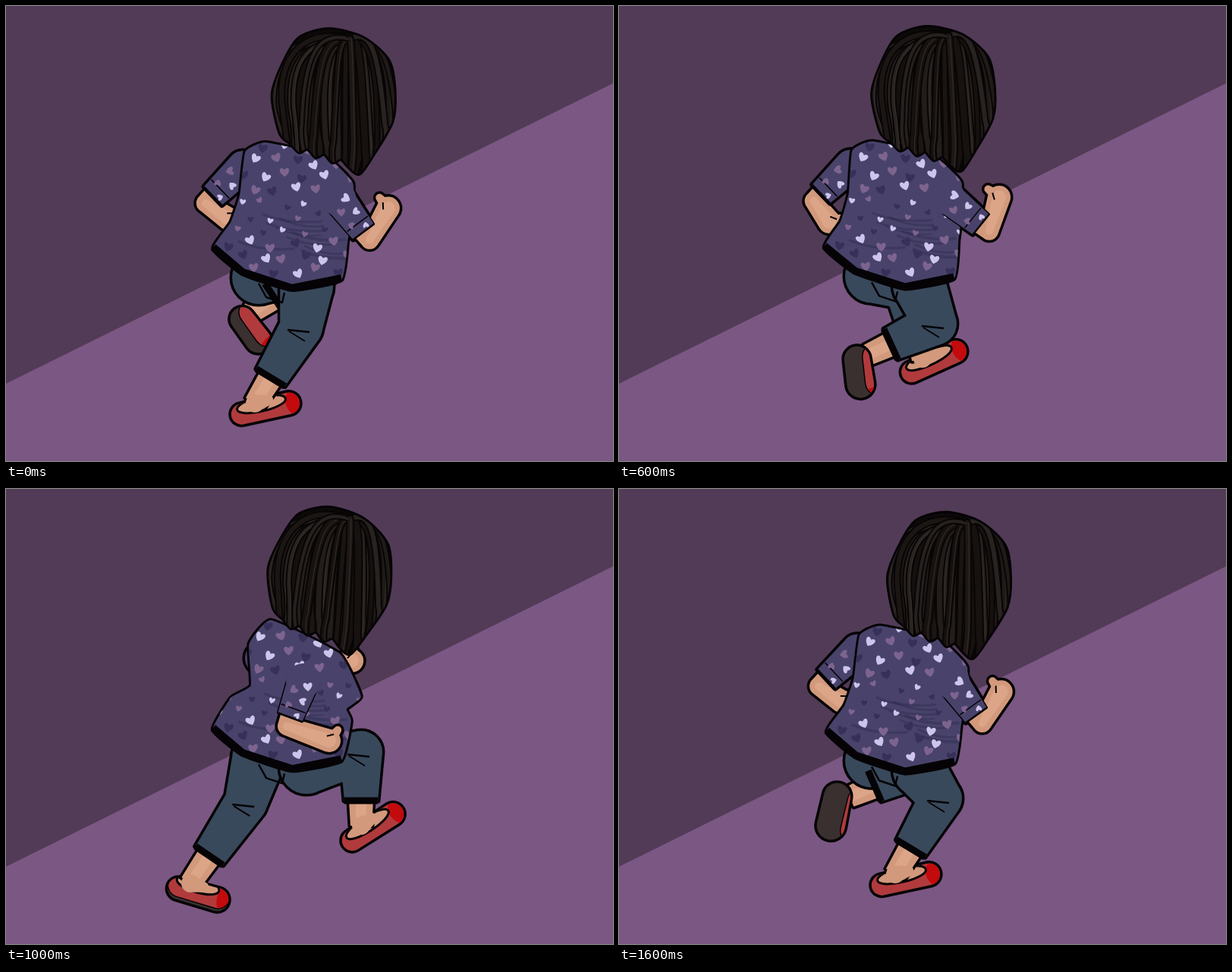
Animation of 800x600 px, one loop 1700 ms. Source, as an HTML page with a canvas:

```html
<!DOCTYPE html>
<html lang="en">
<head>
<meta charset="utf-8">
<title>Running girl</title>
<style>
html, body { margin: 0; width: 100%; height: 100%; overflow: hidden; background: #523b57; }
canvas { display: block; width: 800px; height: 600px; }
</style>
</head>
<body>
<canvas id="stage" width="800" height="600"></canvas>
<script>
const ctx = document.getElementById('stage').getContext('2d');
const LOOP = 1700, STEP = 100, BEAT = 200;
const INK = '#050305', SHIRT = '#49436b', DENIM = '#39495c', SKIN = '#d2997c', GLOW = '#dca588',
  RED = '#b13a3c', TOE = '#c30a0d', SOLE = '#39302f';
const PRINT = ['#cdc5ec', '#7d648f', '#373159'];

const nums = s => s.match(/-?[\d.]+/g).map(Number);
const lerp = (a, b, t) => a + (b - a) * t;
const mix = (a, b, t) => a.map((v, i) => lerp(v, b[i], t));
const clamp = v => Math.min(1, Math.max(0, v));
const ease = (from, to, v) => { const t = clamp((v - from) / (to - from)); return t * t * (3 - 2 * t); };
const wave = (time, peak, n = 1) => Math.cos(2 * Math.PI * n * (time - peak) / LOOP);
const rnd = n => { const v = Math.sin(n * 12.9898 + 4) * 43758.5453; return v - Math.floor(v); };

// Motion paths: one point per beat. Ankles carry the foot's angle too.
const path = s => s.split(' ').map(nums);
const KNEE = path('389,424 376,432 365,430 417,419 473,371 468,347 464,362 444,384 424,408');
const ANKLE_R = path('328,524,-13 279,538,38 264,498,65 328,460,82 397,457,32 468,444,-33 477,457,-25 439,475,-20 364,508,-13');
const ANKLE_L = path('322,405,53 412,425,-5 462,404,-47 400,465,-25 312,504,-23 243,520,16 232,472,98 266,428,114 304,406,102');

// Smooth periodic curve through a path; the last beat is cut short by the loop.
function follow(points, time) {
  const n = points.length, i = Math.floor(time / BEAT);
  const at = k => points[(k + n) % n];
  const when = k => k * BEAT - (k >= n ? n * BEAT - LOOP : k < 0 ? LOOP - n * BEAT : 0);
  const span = when(i + 1) - when(i), t = (time - when(i)) / span, t2 = t * t, t3 = t2 * t;
  return at(i).map((p, j) => {
    const q = at(i + 1)[j];
    const m = span * (q - at(i - 1)[j]) / (when(i + 1) - when(i - 1));
    const w = span * (at(i + 2)[j] - p) / (when(i + 2) - when(i));
    return (2 * t3 - 3 * t2 + 1) * p + (t3 - 2 * t2 + t) * m + (3 * t2 - 2 * t3) * q + (t3 - t2) * w;
  });
}

// Torso seen from behind and turned; both share the hem.
const HEM = ' 273,318 312,351 377,372 442,359 ';
const BACK = nums('342,178 315,190 308,246 296,283' + HEM + '450,308 453,290 457,232 420,196');
const TURNED = nums('350,174 321,205 323,260 297,276' + HEM + '455,307 449,291 468,274 440,218');

// Arms: shoulder by turn, then elbow and hand for each stage of the swing.
const ARM_L = { square: [312, 210], turned: [332, 224],
  mid: [263, 260, 293, 280], high: [240, 250, 237, 297], side: [334, 252, 362, 256], far: [411, 238, 452, 225] };
const ARM_R = { square: [438, 252], turned: [388, 254],
  mid: [479, 309, 504, 267], high: [511, 266, 494, 214], side: [405, 329, 462, 332], far: [359, 312, 415, 332] };

// Smooth closed path through flat x,y pairs.
function blob(p, k) {
  const n = p.length / 2, X = i => p[2 * ((i + n) % n)], Y = i => p[2 * ((i + n) % n) + 1];
  const shape = new Path2D();
  shape.moveTo(X(0), Y(0));
  for (let i = 0; i < n; i++) {
    shape.bezierCurveTo(
      X(i) + (X(i + 1) - X(i - 1)) * k, Y(i) + (Y(i + 1) - Y(i - 1)) * k,
      X(i + 1) - (X(i + 2) - X(i)) * k, Y(i + 1) - (Y(i + 2) - Y(i)) * k, X(i + 1), Y(i + 1));
  }
  shape.closePath();
  return shape;
}

// Tapered limb through x,y,r triples, flat at its last point unless rounded.
function tube(p, round) {
  const shape = new Path2D();
  for (let i = 0; i < p.length; i += 3) {
    const [x, y, r, X, Y, R] = p.slice(i, i + 6), last = i + 3 >= p.length;
    if (!last || round) {
      shape.moveTo(x + r, y);
      shape.arc(x, y, r, 0, 2 * Math.PI);
      shape.closePath();
    }
    if (last) break;
    const len = Math.hypot(X - x, Y - y) || 1, nx = (Y - y) / len, ny = (x - X) / len;
    shape.moveTo(x + nx * r, y + ny * r);
    shape.lineTo(X + nx * R, Y + ny * R);
    shape.lineTo(X - nx * R, Y - ny * R);
    shape.lineTo(x - nx * r, y - ny * r);
    shape.closePath();
  }
  return shape;
}

function line(p, width) {
  ctx.beginPath();
  for (let i = 0; i < p.length; i += 2) ctx.lineTo(p[i], p[i + 1]);
  ctx.lineWidth = width;
  ctx.strokeStyle = INK;
  ctx.stroke();
}

function paint(shape, color, edge = 3.5) {
  if (edge) {
    ctx.lineWidth = edge * 2;
    ctx.strokeStyle = INK;
    ctx.stroke(shape);
  }
  ctx.fillStyle = color;
  ctx.fill(shape);
}

// Line across a limb at b, seen from a.
function across(ax, ay, bx, by, half, width) {
  const len = Math.hypot(bx - ax, by - ay) || 1, nx = (by - ay) / len * half, ny = (ax - bx) / len * half;
  line([bx - nx, by - ny, bx + nx, by + ny], width);
}

// Lower foot edge and sole come into view as the foot tips down.
function shoe(ax, ay, angle, sole) {
  const half = 39 - 13 * Math.sin(Math.PI * sole), h = 16 + 6 * sole;
  ctx.save();
  ctx.translate(ax, ay);
  ctx.rotate(angle * Math.PI / 180);
  ctx.translate(12 + 14 * sole, 10 + 8 * sole);
  const body = tube([-half - 7 + h * .85, 0, h * .85, half + 7 - h * .9, 0, h * .9], true);
  paint(body, SOLE);
  ctx.clip(body);
  ctx.translate(0, -sole * h * 2);
  paint(body, RED, sole > .1 ? 1.5 : 0);
  ctx.clip(body);
  const toe = new Path2D();
  toe.ellipse(half + 8, 0, half * .5, h * 1.3, 0, 0, 2 * Math.PI);
  paint(toe, TOE, 0);
  if (sole < .3) {
    const mouth = new Path2D();
    mouth.ellipse(-half * .1, -h * .45, half * .8, h * .5, 0, 0, 2 * Math.PI);
    paint(mouth, SKIN, 3);
  }
  ctx.restore();
}

function leg(hx, hy, [kx, ky], [ax, ay, angle]) {
  const sole = clamp(angle / 130), cx = lerp(kx, ax, .66), cy = lerp(ky, ay, .66);
  const shin = () => {
    paint(tube([cx, cy, 16, ax, ay, 14]), SKIN);
    paint(tube([cx, cy, 7, ax, ay, 7]), GLOW, 0);
  };
  if (sole >= .3) shin();
  shoe(ax, ay, angle, sole);
  if (sole < .3) {
    const turn = angle * Math.PI / 180;
    shin();
    paint(tube([ax, ay, 12, ax + 18 * Math.cos(turn), ay + 18 * Math.sin(turn), 7], true), SKIN, 0);
  }
  paint(tube([hx, hy, 35, kx, ky, 28, cx, cy, 22]), DENIM);
  across(kx, ky, cx, cy, 22, 9);
  line([kx - 18, ky + 3, kx + 11, ky + 6], 2.5);
  line([kx - 16, ky + 5, kx + 5, ky + 18], 2);
}

function forearm([sx, sy, ex, ey, hx, hy]) {
  const len = Math.hypot(hx - ex, hy - ey) || 1, dx = (hx - ex) / len, dy = (hy - ey) / len;
  const arm = tube([lerp(sx, ex, .8), lerp(sy, ey, .8), 13, ex, ey, 12, hx, hy, 15], true);
  arm.addPath(tube([hx, hy, 9, hx + dy * 17 + dx * 6, hy - dx * 17 + dy * 6, 5], true));
  paint(arm, SKIN);
  paint(tube([ex, ey, 5, hx, hy, 9], true), GLOW, 0);
  line([hx + dy * 10 + dx * 3, hy - dx * 10 + dy * 3, hx + dy * 5 - dx * 5, hy - dx * 5 - dy * 5], 2);
}

function sleeve([sx, sy, ex, ey], edge) {
  const cx = lerp(sx, ex, .8), cy = lerp(sy, ey, .8), len = Math.hypot(cx - sx, cy - sy);
  paint(tube([sx, sy, 21, cx, cy, 17]), SHIRT, edge);
  across(sx, sy, lerp(sx, cx, .76), lerp(sy, cy, .76), 17, 1.5);
  across(sx, sy, cx, cy, 17, 2);
  if (edge < 3) paint(tube([sx, sy, 23, sx, sy, 23], true), SHIRT, 0);
  ctx.save();
  ctx.translate(sx, sy);
  ctx.rotate(Math.atan2(cy - sy, cx - sx));
  for (let i = 0; i < 5; i++) heart(len * (.1 + .2 * i), i % 2 ? 8 : -8, 6 - i * .5, PRINT[i % 2], i - 2);
  ctx.restore();
}

function heart(x, y, s, color, turn) {
  ctx.save();
  ctx.translate(x, y);
  ctx.rotate(turn);
  ctx.scale(s, s);
  ctx.beginPath();
  ctx.moveTo(0, 1);
  ctx.bezierCurveTo(-1.7, -.2, -.9, -1.5, 0, -.5);
  ctx.bezierCurveTo(.9, -1.5, 1.7, -.2, 0, 1);
  ctx.fillStyle = color;
  ctx.fill();
  ctx.restore();
}

// The print is laid out on the square torso and carried along by hem and shoulder.
const frame = p => new DOMMatrix([p[14] - p[8], p[15] - p[9], p[0] - p[8], p[1] - p[9], p[8], p[9]]);
const unprint = frame(BACK).inverse();

function shirt(p) {
  const body = blob(p, .07);
  paint(body, SHIRT, 3);
  ctx.save();
  ctx.clip(body);
  const m = frame(p).multiply(unprint);
  ctx.transform(m.a, m.b, m.c, m.d, m.e, m.f);
  ctx.strokeStyle = 'rgba(36,30,64,.3)';
  for (let i = 0; i < 9; i++) {
    const x = 295 + 100 * rnd(i), y = 272 + i * 6;
    ctx.beginPath();
    ctx.moveTo(x, y);
    ctx.quadraticCurveTo(x + 30, y + 14, x + 50 + 30 * rnd(i + 20), y + 10);
    ctx.lineWidth = 2 + 3 * rnd(i + 40);
    ctx.stroke();
  }
  for (let row = 0, n = 0; row < 10; row++) {
    const y = 186 + row * 18, waist = y > 255 && y < 312;
    for (let col = 0; col < 7; col++, n++) {
      const x = 282 + col * 28 + row % 2 * 14 + 10 * (rnd(n) - .5);
      heart(x, y + 12 * (rnd(n + 99) - .5), waist ? 4 : 6.2, PRINT[(col + row * 2) % 3], rnd(n + 50) - .5);
    }
  }
  ctx.restore();
  line(p.slice(8, 16).map((v, i) => i % 2 ? v - 2 : v), 10);
}

// Rounded mop with a ragged lower edge.
const mop = nums('425,27 470,39 503,70 510,112 506,150 480,194 463,217');
for (let i = 0; i < 8; i++) mop.push(450 - i * 11, 209 - i * 3.5 - i % 2 * 8);
mop.push(...nums('359,162 350,112 365,70 386,38'));
const HAIR = blob(mop, .14);

function hair(dx, dy, deg) {
  ctx.save();
  ctx.translate(430 + dx, 70 + dy);
  ctx.rotate(deg * Math.PI / 180);
  ctx.translate(-430, -70);
  paint(HAIR, '#0d0909', 3);
  ctx.clip(HAIR);
  for (let i = 0; i < 34; i++) {
    const t = i * 13 % 34 / 33, bend = 16 * (rnd(i) - .5), tone = 16 + 20 * rnd(i + 7);
    const x = 346 + 172 * t, y = 155 + 55 * Math.sin(t * 2.4) + 30 * rnd(i + 30);
    const strand = (width, color, off) => {
      ctx.beginPath();
      ctx.moveTo(452 + off, 40);
      ctx.bezierCurveTo(lerp(452, x, .65), 22 + 20 * rnd(i + 60), x - bend + off, 60, x + off, y - 50);
      ctx.quadraticCurveTo(x + bend + off, y - 25, lerp(x, 430, .15) - bend + off, y + 14);
      ctx.lineWidth = width;
      ctx.strokeStyle = color;
      ctx.stroke();
    };
    const w = 4 + 5 * rnd(i + 11);
    strand(w + 4, '#080505', 0);
    strand(w, `rgb(${tone + 5},${tone},${tone - 2})`, 0);
    if (i % 3 === 0) strand(1, '#382c28', 1.5);
  }
  ctx.restore();
}

function backdrop() {
  ctx.fillStyle = '#523b57';
  ctx.fillRect(0, 0, 800, 600);
  ctx.fillStyle = '#7b5783';
  ctx.beginPath();
  ctx.moveTo(0, 498);
  ctx.lineTo(800, 102);
  ctx.lineTo(800, 600);
  ctx.lineTo(0, 600);
  ctx.fill();
}

function draw(time) {
  const dx = -6 - 13 * wave(time, 480) + 5 * wave(time, 800, 2);
  const dy = -1 + 6 * wave(time, 770, 2);
  const facing = wave(time, 1100), turn = ease(-.3, .45, facing), far = ease(.5, 1, facing);
  const lift = Math.max(0, wave(time, 370)) ** 3, drift = 24 * wave(time, 675) * turn;

  const sway = p => p.map((v, i) => i % 2 ? v + dy * .5 : v + dx * .45 * clamp((372 - p[i + 1]) / 190));
  const torso = sway(mix(BACK, TURNED, turn));
  const pose = arm => {
    const [x, y] = sway(mix(arm.square, arm.turned, turn));
    const [ex, ey, hx, hy] = mix(mix(mix(arm.mid, arm.high, lift), arm.side, turn), arm.far, far);
    return [x + drift * .5, y, ex + drift, ey, hx + drift, hy];
  };
  const armL = pose(ARM_L), armR = pose(ARM_R);
  const kneeR = follow(KNEE, time), other = follow(KNEE, (time + LOOP / 2) % LOOP);
  const kneeL = [other[0] - 62, other[1] - 18];
  const mx = torso[12], my = torso[13];

  backdrop();
  forearm(armL);
  sleeve(armL, 3.5);
  paint(tube([torso[10] + 14, torso[11] - 14, 21, torso[14] - 32, torso[15] - 10, 21], true), DENIM);
  leg(mx - 44, my - 16, kneeL, follow(ANKLE_L, time));
  leg(mx + 19, my - 4, kneeR, follow(ANKLE_R, time));
  line([mx - 44, my - 8, mx - 34, my + 10, mx - 13, my + 17, mx - 10, my + 4], 2.5);
  sleeve(armR, 3.5);
  shirt(torso);
  forearm(armR);
  sleeve(armR, 1.5);
  hair(dx, dy, .5 - 4 * wave(time, 350));
}

ctx.lineJoin = 'round';
let shown = -1;
function tick() {
  const time = Math.floor(performance.now() % LOOP / STEP) * STEP;
  if (time !== shown) draw(shown = time);
  requestAnimationFrame(tick);
}
tick();
</script>
</body>
</html>
```
